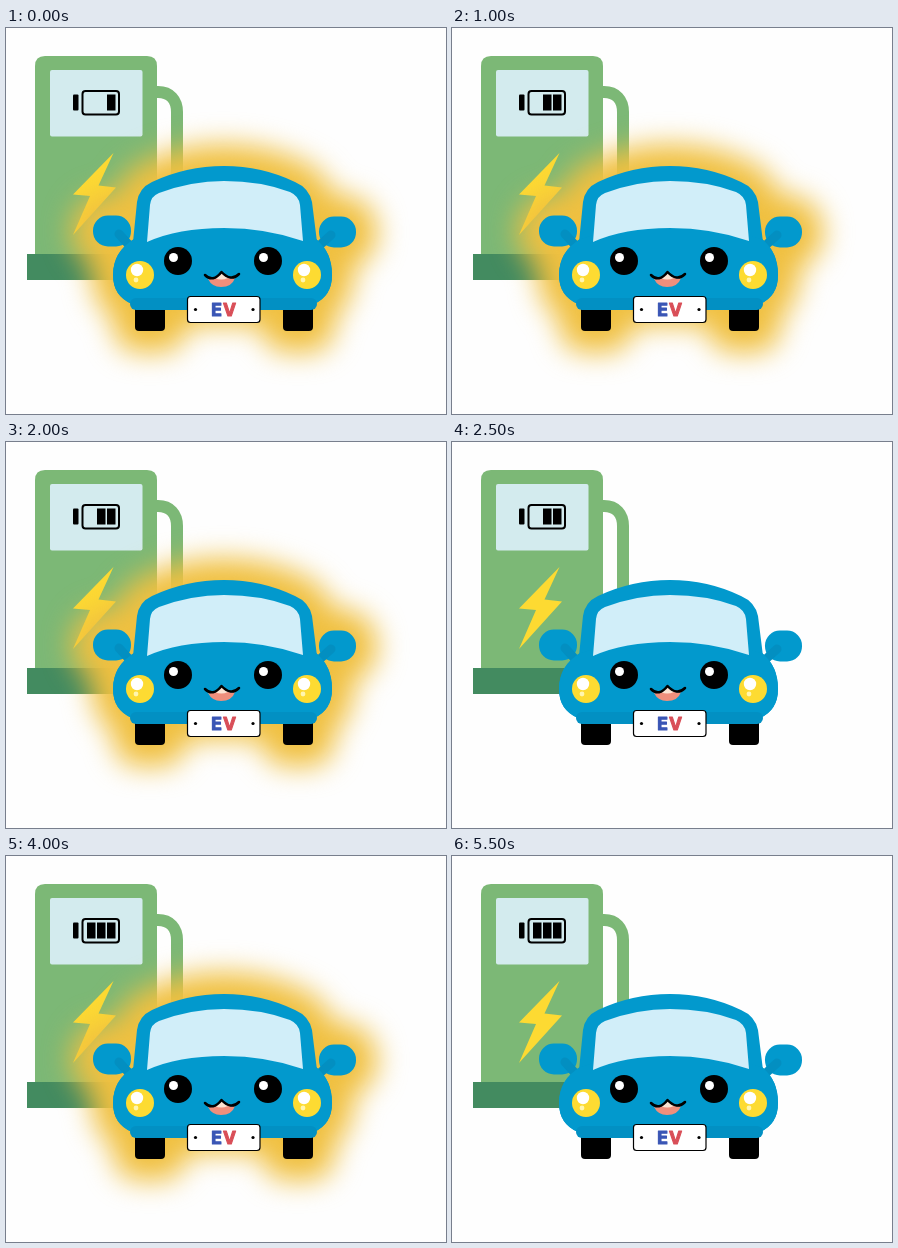
These frames come from a looping animation (440x386 px, 6 s). An HTML page:

```html
<!DOCTYPE html>
<html lang="en">
<head>
<meta charset="utf-8">
<title>Charging car</title>
<style>
  html, body { margin: 0; width: 100%; height: 100%; overflow: hidden; background: #fefefe; }
  svg { display: block; width: 100%; height: 100%; }
  .glow { animation: blink 1s step-end infinite; }
  .bar2 { animation: second 6s step-end infinite; }
  .bar3 { animation: third 6s step-end infinite; }
  .plate { font: 700 17.5px Inter, Roboto, sans-serif; text-anchor: middle; stroke-width: 1.1; stroke-linejoin: round; }
  @keyframes blink { 0% { opacity: 1; } 50%, 100% { opacity: 0; } }
  @keyframes second { 0% { opacity: 0; } 16.6667%, 100% { opacity: 1; } }
  @keyframes third { 0% { opacity: 0; } 50%, 100% { opacity: 1; } }
</style>
</head>
<body>
<svg viewBox="0 0 440 386">
  <defs>
    <filter id="soft" filterUnits="userSpaceOnUse" x="0" y="30" width="440" height="356" color-interpolation-filters="sRGB">
      <feGaussianBlur stdDeviation="14"/>
    </filter>
    <g id="shell">
      <path d="M127 214L131 174Q133 160 146 154Q180 138 218 138Q256 138 289 154Q303 160 306 174L311 214Z"/>
      <path d="M128 211Q107 224 107 247Q107 268 126 276H308Q326 268 326 247Q326 224 310 211Q265 196 218 196Q172 196 128 211Z"/>
      <rect x="87" y="187.500" width="38" height="31" rx="15"/>
      <rect x="313" y="188.500" width="37" height="31" rx="15"/>
    </g>
    <g id="wheels">
      <rect x="129" y="274" width="30" height="29" rx="4"/>
      <rect x="277" y="274" width="30" height="29" rx="4"/>
    </g>
    <g id="eye">
      <circle r="14"/>
      <circle cx="-4.500" cy="-3.500" r="4.500" fill="#fff"/>
    </g>
    <g id="lamp">
      <circle r="14" fill="#fddb32"/>
      <circle cx="-3" cy="-5" r="6.200" fill="#fff"/>
      <circle cx="-4" cy="5" r="2.400" fill="#fff6b0"/>
    </g>
  </defs>

  <!-- Charging station -->
  <path d="M149 64H152C164 64 171 72 171 84V155" fill="none" stroke="#7cb876" stroke-width="12"/>
  <path d="M29 228V38Q29 28 39 28H141Q151 28 151 38V228Z" fill="#7cb876"/>
  <rect x="21" y="226" width="138" height="26" fill="#438b60"/>
  <rect x="44" y="42" width="92.500" height="66.500" rx="2" fill="#d3ebee"/>
  <rect x="76.500" y="63" width="36.500" height="23.500" rx="3" fill="none" stroke="#000" stroke-width="2"/>
  <rect x="67" y="66.500" width="5.500" height="16" rx="1"/>
  <rect x="101" y="66.500" width="8.500" height="16"/>
  <rect class="bar2" x="91" y="66.500" width="8.500" height="16"/>
  <rect class="bar3" x="81" y="66.500" width="8.500" height="16"/>
  <path d="M107.500 125L67 166.500L84 168L67 207L110 159.500L92.500 157.500Z" fill="#fdda32"/>

  <g class="glow">
    <g filter="url(#soft)" fill="#f0c040" stroke="#f0c040" stroke-width="43" stroke-linejoin="round">
      <use href="#shell"/>
      <use href="#wheels"/>
    </g>
  </g>

  <!-- Car -->
  <use href="#wheels"/>
  <use href="#shell" fill="#0299cd"/>
  <g stroke="#038fc1" stroke-width="9" stroke-linecap="round">
    <path d="M113 206L123 217"/>
    <path d="M325 207L314 217"/>
  </g>
  <path d="M128 211Q107 224 107 247Q107 268 126 276H308Q326 268 326 247Q326 224 310 211Q265 196 218 196Q172 196 128 211Z" fill="#0299cd"/>
  <rect x="124" y="270" width="187" height="12" rx="6" fill="#0290c3"/>
  <path d="M141 214L144 177Q145 168 153 165Q185 153 218 153Q255 153 284 164Q293 168 294 177L297 213Q260 200 218 200Q172 200 141 214Z" fill="#d1eef9"/>
  <use href="#eye" x="172" y="233"/>
  <use href="#eye" x="262" y="233"/>
  <use href="#lamp" x="134" y="247"/>
  <use href="#lamp" x="301" y="247"/>
  <path d="M202 251Q210 252 215.500 245Q221 252 229 250Q226 259 215 259Q206 259 202 251Z" fill="#ef8f7c"/>
  <path d="M209 250L215.500 245L222 250Q215 253 209 250Z" fill="#fbe3d2"/>
  <path d="M199 247Q207 255 215.500 244Q225 254 233 246" fill="none" stroke="#000" stroke-width="2.500" stroke-linecap="round" stroke-linejoin="round"/>

  <rect x="181.500" y="268.500" width="72.500" height="26" rx="3" fill="#fff" stroke="#000" stroke-width="1.200"/>
  <circle cx="189.500" cy="281.500" r="1.600"/>
  <circle cx="247" cy="281.500" r="1.600"/>
  <g class="plate">
    <text x="210.500" y="288.300" fill="#3a56b5" stroke="#3a56b5">E</text>
    <text x="223.500" y="288.300" fill="#d94f58" stroke="#d94f58">V</text>
  </g>
</svg>
</body>
</html>
```
